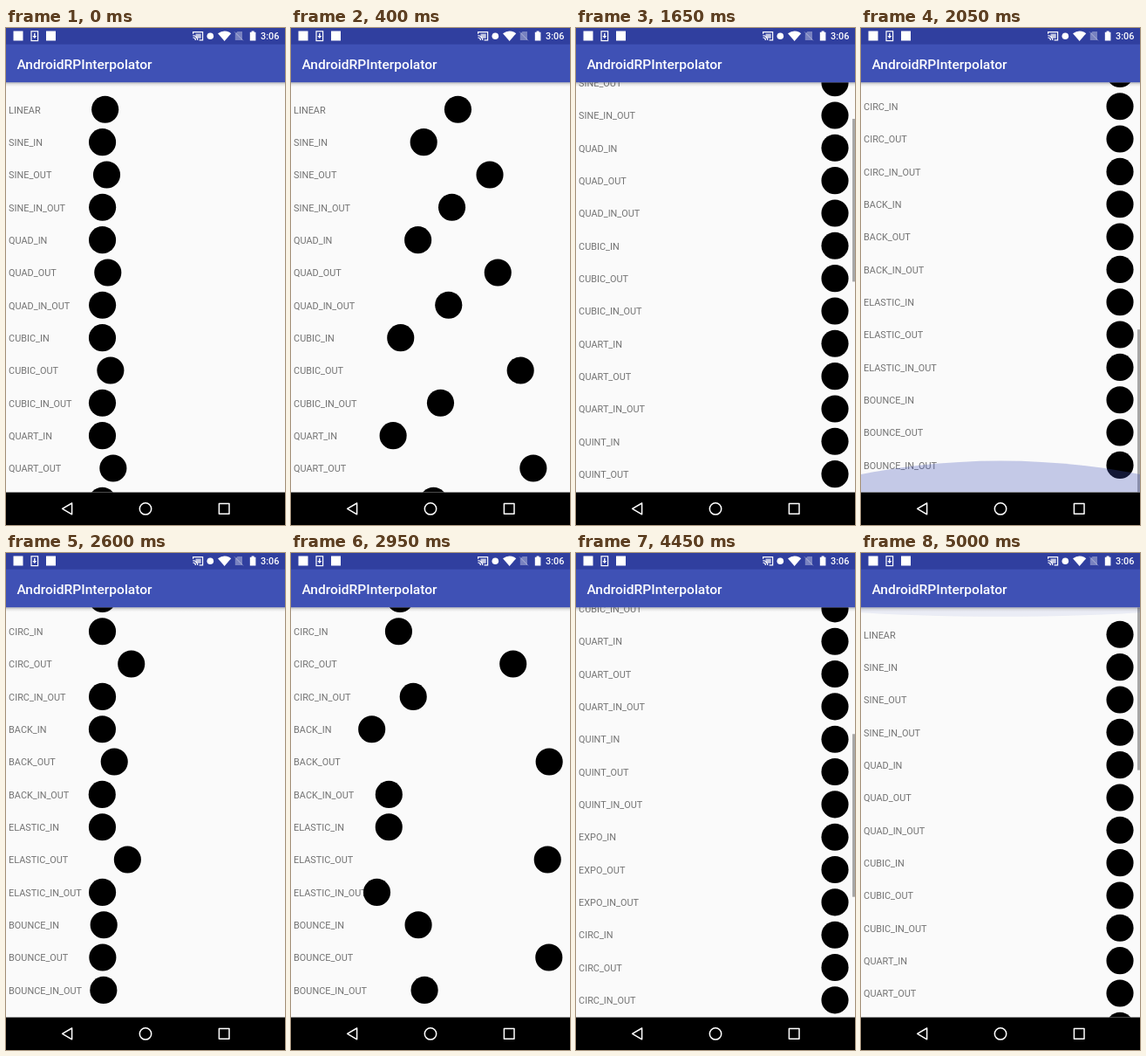
Write an HTML page that moves like this. It is 320 by 569 pixels and loops after 5050 ms.

```html
<!DOCTYPE html>
<html lang="en">
<head>
<meta charset="utf-8">
<title>AndroidRPInterpolator</title>
<style>
  html, body { margin: 0; width: 100%; height: 100%; overflow: hidden; background: #fafafa; }
  svg { display: block; width: 100%; height: 100%; font-family: Roboto, sans-serif; }
  .label { font-size: 10.89px; fill: #737373; }
  .line { fill: none; stroke: #fff; }
</style>
</head>
<body>
<svg viewBox="0 0 320 569">
  <defs>
    <clipPath id="listClip"><rect y="62.2" width="320" height="469.4"/></clipPath>
    <linearGradient id="shade" x2="0" y2="1">
      <stop offset="0" stop-opacity=".3"/>
      <stop offset=".4" stop-opacity=".1"/>
      <stop offset="1" stop-opacity="0"/>
    </linearGradient>
  </defs>
  <rect width="320" height="569" fill="#fafafa"/>
  <g clip-path="url(#listClip)">
    <g id="list"></g>
    <rect id="thumb" x="317" width="3" height="186.4" fill-opacity=".33"/>
    <ellipse id="glow" cx="160" rx="480" fill="#3f51b5"/>
  </g>
  <rect y="62.2" width="320" height="5" fill="url(#shade)"/>

  <rect width="320" height="62.2" fill="#3f51b5"/>
  <rect width="320" height="18.7" fill="#303f9f"/>
  <text x="12.4" y="46.5" font-size="15.56" font-weight="500" fill="#fff">AndroidRPInterpolator</text>

  <g fill="#fff">
    <rect x="8.5" y="3.5" width="11" height="11"/>
    <rect class="line" x="29" y="3.8" width="7.6" height="10.8" stroke-width="1.2"/>
    <path d="M32.1 6h1.4v3h1.8l-2.5 3-2.5-3h1.8z"/>
    <rect x="46" y="3.5" width="11" height="11"/>
    <path class="line" d="M214.6 6.8V4.6h11v9.2h-4M214.4 8.6a5.4 5.4 0 0 1 5.4 5.4M214.4 11a3 3 0 0 1 3 3" stroke-width="1.2"/>
    <rect x="217.5" y="6.6" width="6.2" height="5.2" opacity=".7"/>
    <circle cx="234.3" cy="9.3" r="3.8"/>
    <path d="M243 6.2q7.6-5.4 15.2 0L250.6 15z"/>
    <path d="M265.5 4h5.5v10h-8.2V6.8z" opacity=".35"/>
    <path class="line" d="M262 4.4l10 10" stroke-width="1" opacity=".4"/>
    <path d="M279.8 4.8h1.8V3.6h3v1.2h1.8v9.8h-6.6z"/>
    <text x="292" y="13.3" font-size="10.89" font-weight="500">3:06</text>
  </g>

  <rect y="531.6" width="320" height="37.4"/>
  <g class="line" stroke-width="1.5" stroke-linejoin="round">
    <path d="M64.6 550.4l11-6.4v12.8z"/>
    <circle cx="160" cy="550.4" r="6.7"/>
    <rect x="244.4" y="544.6" width="11.6" height="11.6"/>
  </g>
</svg>
<script>
const LOOP = 5050, STEP = 50;
const TOP = 62.2, BOTTOM = 531.6, ROW = 37.333;
const SCROLL_RANGE = 712.9, THUMB_TRAVEL = 283;
const START_X = 110.5, TRAVEL = 186.5;
const GLOW_RADIUS = 480, GLOW_HEIGHT = 64.3;

const clamp = v => Math.min(1, Math.max(0, v));
const power = n => p => p ** n;
const back = s => p => p * p * ((s + 1) * p - s);
const elastic = period => p =>
  -(2 ** (10 * (p - 1))) * Math.sin((p - 1 - period / 4) * 2 * Math.PI / period);

function bounceOut(p) {
  const x = p * 2.75;
  if (x < 1) return x * x;
  if (x < 2) return (x - 1.5) ** 2 + 0.75;
  if (x < 2.5) return (x - 2.25) ** 2 + 0.9375;
  return (x - 2.625) ** 2 + 0.984375;
}

// Each family: ease-in curve, optionally a separate curve for the in-out form.
const families = {
  SINE: [p => 1 - Math.cos(p * Math.PI / 2)],
  QUAD: [power(2)],
  CUBIC: [power(3)],
  QUART: [power(4)],
  QUINT: [power(5)],
  EXPO: [p => p > 0 ? 2 ** (10 * (p - 1)) : 0],
  CIRC: [p => 1 - Math.sqrt(1 - p * p)],
  BACK: [back(1.70158), back(2.59491)],
  ELASTIC: [elastic(0.3), elastic(0.45)],
  BOUNCE: [p => 1 - bounceOut(1 - p)]
};

const rows = [["LINEAR", p => p]];
for (const [name, [ease, both = ease]] of Object.entries(families)) {
  rows.push(
    [name + "_IN", ease],
    [name + "_OUT", p => 1 - ease(1 - p)],
    [name + "_IN_OUT", p => p < 0.5 ? both(2 * p) / 2 : 1 - both(2 - 2 * p) / 2]
  );
}

const list = document.getElementById("list");
const thumb = document.getElementById("thumb");
const glow = document.getElementById("glow");

function add(tag, attrs) {
  const el = document.createElementNS("http://www.w3.org/2000/svg", tag);
  for (const key in attrs) el.setAttribute(key, attrs[key]);
  return list.appendChild(el);
}

const dots = rows.map(([name], i) => {
  const y = 93.3 + i * ROW;
  add("text", { class: "label", x: 3.1, y: y + 4.3 }).textContent = name;
  return add("circle", { cy: y, r: 15.56 });
});

function dotProgress(t) {
  const elapsed = t < 2584 ? t + 17 + Math.min(17, t * 0.0425) : t - 2584;
  return clamp(elapsed / 1000);
}

function fling(t, start, end) {
  const u = clamp((t - start) / (end - start));
  return 1 - (1 - u ** 1.5) ** 2;
}

// Edge glow: a quick swell on impact, then a decelerating retreat.
function glowStrength(t, impact) {
  const age = t - impact;
  return age < 30 ? clamp(age / 30) : (1 - clamp((age - 30) / 600)) ** 2;
}

function render(t) {
  const p = dotProgress(t);
  dots.forEach((dot, i) => dot.setAttribute("cx", START_X + TRAVEL * rows[i][1](p)));

  const scroll = fling(t, 1575, 1990) - fling(t, 4275, 4680);
  list.setAttribute("transform", `translate(0 ${-SCROLL_RANGE * scroll})`);

  const thumbAlpha = t >= 4300 ? 1 : t >= 1600 ? 1 - clamp((t - 2240) / 240) : 0;
  thumb.setAttribute("y", TOP + THUMB_TRAVEL * scroll);
  thumb.setAttribute("opacity", thumbAlpha);

  const atTop = t > 4000;
  const strength = glowStrength(t, atTop ? 4680 : 1990);
  const scale = 0.62 * strength;
  const offset = (GLOW_HEIGHT - GLOW_RADIUS) * scale;
  glow.setAttribute("cy", atTop ? TOP + offset : BOTTOM - offset);
  glow.setAttribute("ry", GLOW_RADIUS * scale);
  glow.setAttribute("opacity", 0.32 * strength);
}

const origin = performance.now();
function tick() {
  const t = (performance.now() - origin) % LOOP;
  render(Math.floor(t / STEP) * STEP);
  requestAnimationFrame(tick);
}
tick();
</script>
</body>
</html>
```
